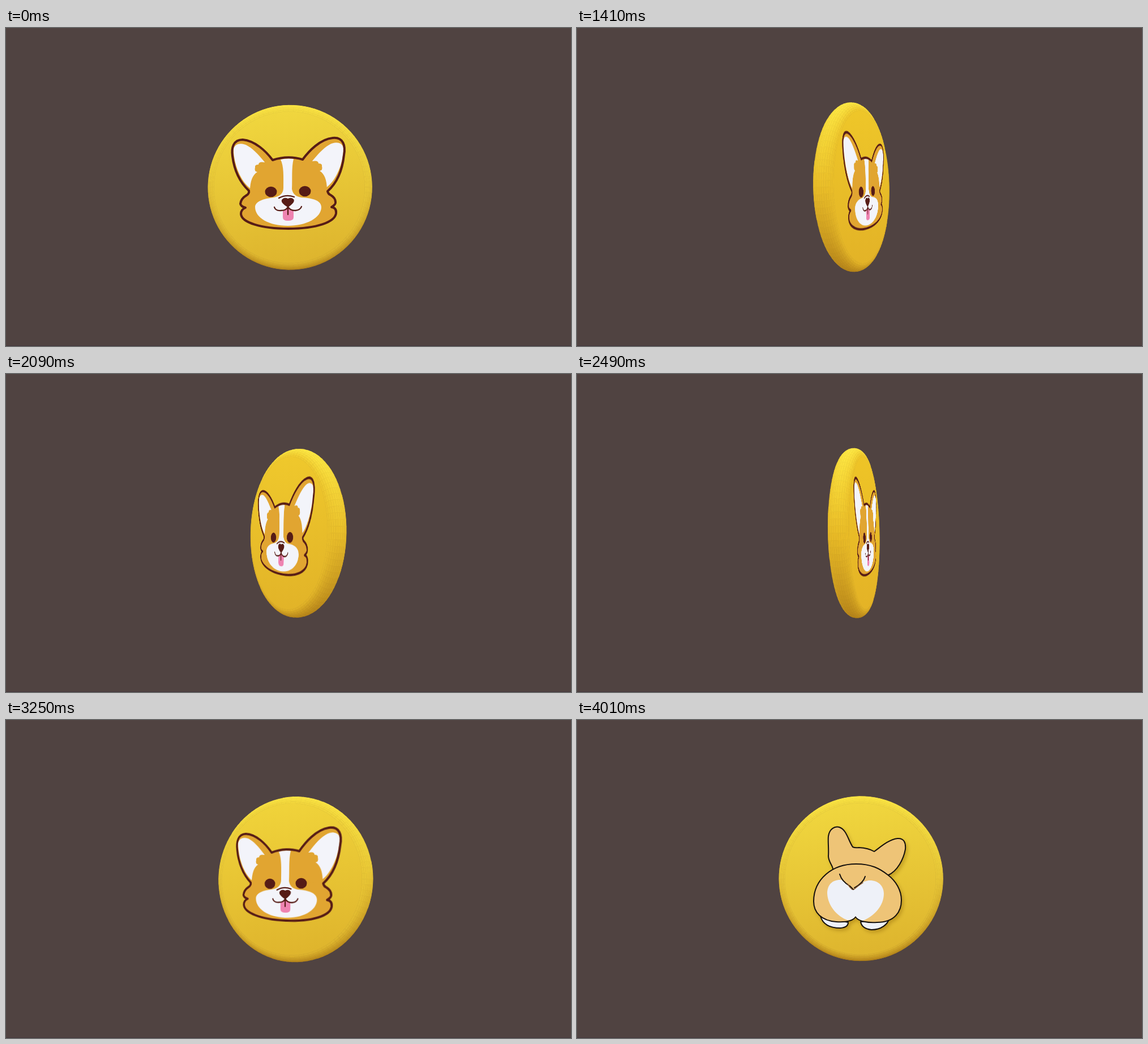
These frames come from a looping animation (998 by 561 pixels, 4.98 s). An HTML page with a canvas:

```html
<!DOCTYPE html>
<html lang="en">
<head>
<meta charset="utf-8">
<title>Spinning dog coin</title>
<style>
html, body { margin: 0; width: 100%; height: 100%; overflow: hidden; background: #504341; }
#stage { position: relative; width: 998px; height: 561px; overflow: hidden; box-shadow: inset 0 -1px #43373b; }
canvas, svg { position: absolute; left: 0; top: 0; }
svg { transform-origin: 0 0; fill: none; stroke-linejoin: round; stroke-linecap: round; }
</style>
</head>
<body>
<div id="stage">
<canvas id="coin" width="998" height="561"></canvas>

<svg id="front" width="998" height="561">
  <defs>
    <path id="head" d="M471 233Q498 224 524 232C535 217 555 196 577 194C596 192 600 208 597 224C594 252 584 274 568 288Q569 293 574 295Q582 300 582 307Q583 311 575 316Q584 317 583 327C581 342 550 354 499 354C450 354 416 343 415 328Q415 320 423 317Q415 315 414 310Q415 301 425 295Q430 292 429 287C413 272 403 250 400 226C398 212 401 197 418 197C440 199 459 217 471 233Z"/>
  </defs>
  <use href="#head" fill="#e1a531"/>
  <g id="ear">
    <path fill="#f3f4fa" d="M402 214C404 203 417 202 427 208C439 215 449 227 458 238L450 262L433 284C415 272 402 240 402 214Z"/>
    <path fill="#e1a531" d="M431 288C431 269 436 259 444 254Q438 253 440 246Q439 241 446 241Q446 235 457 237L485 240V290Z"/>
  </g>
  <use href="#ear" transform="matrix(-1 0 0 1 998 -2)"/>
  <path fill="#f3f4fa" d="M485 232Q497 229 508 231C504 246 506 268 505 284Q507 297 522 299C543 300 557 305 557 316C557 335 530 349 498 349C465 349 440 335 440 316C440 306 455 301 473 299Q490 296 490 282C490 262 491 244 485 232Z"/>
  <path fill="#ee83b1" d="M489 322V334Q489 340 498 340Q508 340 508 334V321Q501 321 498 316Q495 322 489 322Z"/>
  <g fill="#561c16">
    <ellipse cx="468" cy="289" rx="10.5" ry="9.3"/>
    <ellipse cx="528" cy="288" rx="10.5" ry="9.3"/>
    <path d="M498 316C490 312 484 306 488 302Q492 298 498 301Q504 298 508 302C511 306 505 312 498 316Z"/>
  </g>
  <g stroke="#561c16" stroke-width="2.3">
    <path d="M482 300Q495 293 509 298M474 316Q476 323 486 322Q496 322 498 315Q501 322 511 322Q520 321 522 315M498 318V329"/>
    <use href="#head" stroke-width="4"/>
  </g>
</svg>

<svg id="back" width="998" height="561">
  <g stroke="#15100c" stroke-width="2" style="filter:drop-shadow(3px 4px 3px rgba(130,85,0,.35))">
    <path fill="#eef1f8" d="M430 346C434 360 445 367 465 367Q479 366 479 357ZM501 356Q503 368 520 370C538 370 549 360 551 351Z"/>
    <path fill="#eec477" d="M452 263C452 257 444 250 444 240C445 228 443 215 444 205C446 192 455 187 463 189C476 193 479 212 487 224Q491 226 498 225Q515 226 525 232C535 225 550 211 566 209C578 208 581 217 580 228C577 245 566 267 549 274Z"/>
    <path fill="#eec477" d="M493 254C520 254 535 262 550 274C563 284 573 300 573 318C573 337 562 357 530 357C515 358 497 356 492 347C488 354 475 357 458 356C432 354 418 340 418 320C418 300 425 285 440 272C455 259 472 254 493 254Z"/>
    <path fill="#eef1f8" stroke="none" d="M478 353C460 347 443 328 442 306C442 290 452 281 467 282Q478 290 487 300Q498 286 515 283C532 282 542 293 542 306C542 328 525 346 505 354Q496 352 492 346Q487 353 478 353Z"/>
    <path d="M464 272Q468 285 482 293L488 299M509 276Q506 287 490 296"/>
    <path stroke="#8a5624" stroke-width="1.5" d="M478 289Q481 295 486 299M505 287Q496 293 489 299"/>
  </g>
</svg>
</div>
<script>
const $ = id => document.getElementById(id), ctx = $('coin').getContext('2d');
const DEPTH = 545, FLAT = 130, BEVEL = 14.5, SEGS = 96, STEPS = 14;
const REST = -4, TURN = 900, START = 1020, END = 4010, RAMP = 360, LOOP = 4980;
const RATE = TURN / (END - START - RAMP);

// Steady spin with a smooth ramp at both ends
const ramp = t => { const x = t / RAMP; return RATE * RAMP * (x ** 3 - x ** 4 / 2); };
function angleAt(t) {
  if (t < 1090) return REST;
  t = Math.min(END, 1090 + Math.floor((t - 1090) / 40) * 40);
  const go = t - START, left = END - t;
  if (go < RAMP) return REST + ramp(go);
  if (left < RAMP) return REST + TURN - ramp(left);
  return REST + RATE * (go - RAMP / 2);
}

const spin = a => new DOMMatrix().rotateAxisAngle(0, 1, 0, a).rotateAxisAngle(1, 0, 0, 1.25);
function camera() {
  const lens = new DOMMatrix();
  lens.m34 = -1 / DEPTH;
  return new DOMMatrix().translate(499.3, 280.5).multiply(lens);
}

// Map of one coin face onto the screen
function plane(a, flip) {
  const m = camera().multiply(spin(a)).rotateAxisAngle(0, 1, 0, flip).translate(0, 0, BEVEL);
  m.m13 = m.m23 = m.m43 = m.m31 = m.m32 = m.m34 = 0;
  m.m33 = 1;
  return m;
}
const sides = [['front', 0, REST], ['back', 180, REST + TURN]].map(([id, flip, home]) =>
  ({ el: $(id), flip, z: flip ? -BEVEL : BEVEL, inverse: plane(home, flip).inverse() }));

const mix = (a, b, k) => a.map((v, i) => v + (b[i] - v) * k);
const rgb = c => `rgb(${c.map(Math.round)})`;
const area = p => p.reduce((s, [x, y], i) => {
  const [u, v] = p[(i + 1) % p.length];
  return s + x * v - u * y;
}, 0);

function fill(points, paint) {
  ctx.beginPath();
  points.forEach(p => ctx.lineTo(...p));
  ctx.closePath();
  ctx.fillStyle = ctx.strokeStyle = paint;
  ctx.fill();
  ctx.stroke();
}

function draw(angle) {
  const turn = spin(angle), view = camera().multiply(turn);
  const project = (x, y, z) => {
    const p = view.transformPoint(new DOMPoint(x, y, z));
    return [p.x / p.w, p.y / p.w];
  };
  const side = Math.abs(Math.sin(angle * Math.PI / 180)) ** 2;
  const top = mix([240, 214, 62], [238, 195, 38], side);
  const low = mix([222, 181, 46], [228, 179, 38], side);
  const lat = k => (k / STEPS - .5) * Math.PI;
  const ring = f => Array.from({ length: SEGS }, (_, i) => {
    const t = i / SEGS * 2 * Math.PI, r = FLAT + BEVEL * Math.cos(f);
    return project(r * Math.cos(t), r * Math.sin(t), BEVEL * Math.sin(f));
  });
  const rings = Array.from({ length: STEPS + 1 }, (_, k) => ring(lat(k)));

  ctx.clearRect(0, 0, 998, 561);
  ctx.lineWidth = .6;
  for (let k = 0; k < STEPS; k++) for (let i = 0; i < SEGS; i++) {
    const j = (i + 1) % SEGS;
    const quad = [rings[k][i], rings[k][j], rings[k + 1][j], rings[k + 1][i]];
    if (area(quad) <= 0) continue;
    const t = (i + .5) / SEGS * 2 * Math.PI, f = lat(k + .5);
    const n = turn.transformPoint(new DOMPoint(Math.cos(f) * Math.cos(t), Math.cos(f) * Math.sin(t), Math.sin(f)));
    const base = mix(top, low, (Math.sin(t) + 1) / 2);
    fill(quad, rgb(n.y < 0 ? mix(base, [255, 233, 68], Math.min(1, -n.y * 1.15)) : mix(base, [178, 128, 24], n.y)));
  }

  for (const { el, flip, z, inverse } of sides) {
    const disc = rings[flip ? 0 : STEPS];
    const seen = area(disc) * z > 0;
    el.style.visibility = seen ? 'visible' : 'hidden';
    if (!seen) continue;
    const [x, y] = project(0, 0, z);
    const paint = ctx.createLinearGradient(x - 18, y - FLAT, x + 18, y + FLAT);
    paint.addColorStop(0, rgb(top));
    paint.addColorStop(1, rgb(low));
    fill(disc, paint);
    el.style.transform = plane(angle, flip).multiply(inverse).toString();
  }
}

let last;
function tick() {
  const angle = angleAt(performance.now() % LOOP);
  if (angle !== last) draw(last = angle);
  requestAnimationFrame(tick);
}
tick();
</script>
</body>
</html>
```
